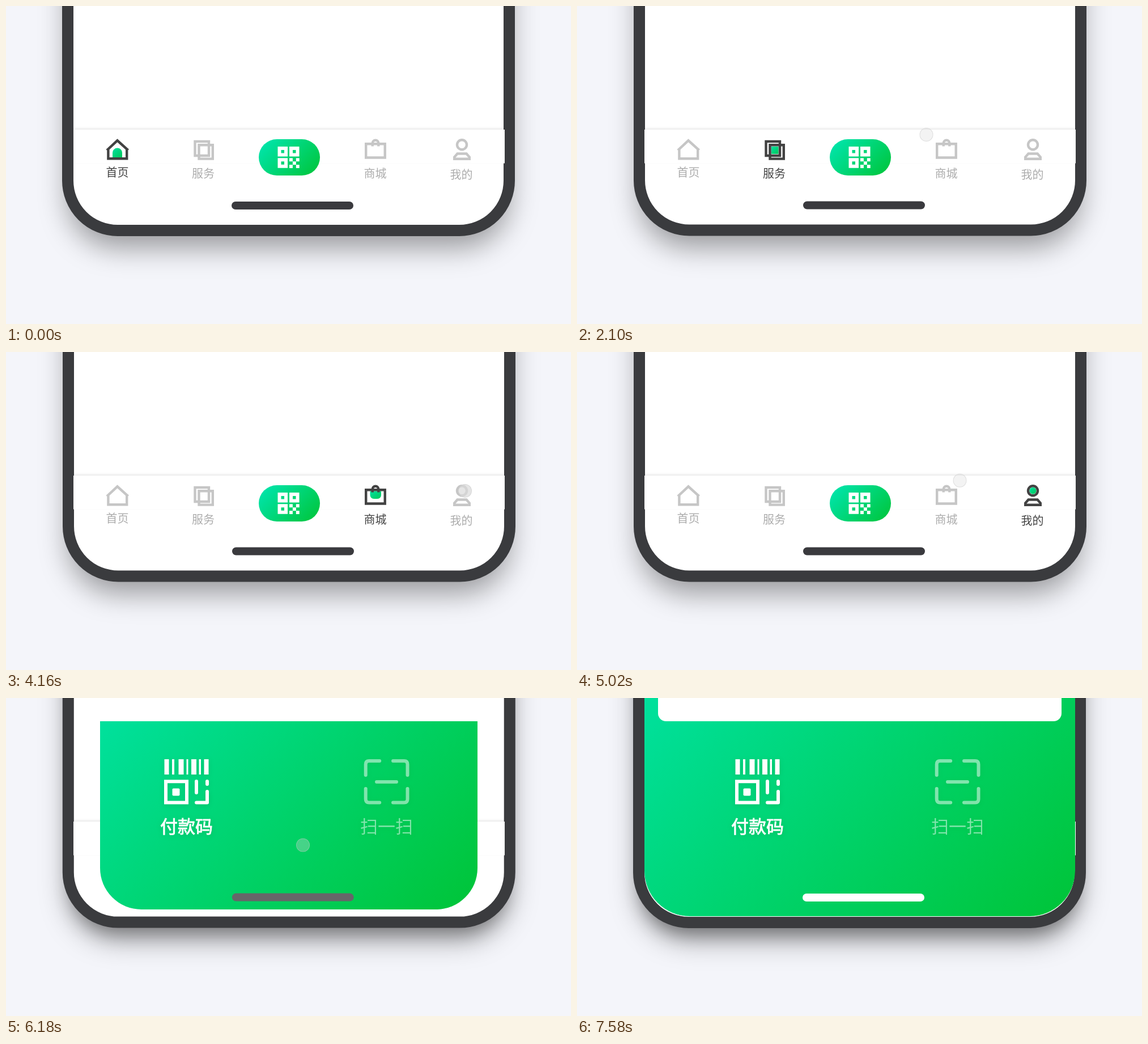
An HTML page for the animation above (8280 ms loop, 997 by 561 pixels).

```html
<!DOCTYPE html>
<html lang="zh-CN">
<head>
<meta charset="utf-8">
<style>
  html, body { margin: 0; width: 100%; height: 100%; overflow: hidden; background: #f4f5fa; }
  #stage { position: relative; width: 997px; height: 561px; overflow: hidden; }
  #stage div, svg { position: absolute; box-sizing: border-box; }
  svg { left: 0; top: 0; width: 997px; height: 561px; }
  text { font-family: "Noto Sans CJK SC", "Noto Sans CJK", "Noto Sans", sans-serif; text-anchor: middle; }
  #phone { left: 99px; top: -300px; width: 799px; height: 706px; border: 20px solid #3a3b3e;
    border-radius: 98px; background: #fff; }
  #bar { left: 119px; top: 217.5px; width: 761px; height: 60px; background: #fff;
    box-shadow: 0 -1px 5px rgba(0,0,0,.13); clip-path: inset(-10px 0 0 0); }
  #clip { inset: 0; clip-path: inset(0 118px 176px 118.5px round 0 0 80px 80px); }
  #green { background: linear-gradient(135deg, #00e7b4, #00c437); }
  #card { left: 143px; top: -60px; width: 712px; height: 101px; border-radius: 14px; background: #fff; }
  #home { left: 398px; top: 345.3px; width: 214.5px; height: 14.2px; border-radius: 7.1px; }
  #dot { left: -12px; top: -12px; width: 24px; height: 24px; border-radius: 50%;
    border: 1px solid rgba(195,195,195,.45); }
  #panel { filter: drop-shadow(0 2px 4px rgba(0,90,30,.18)); }
</style>
</head>
<body>
<div id="stage">
  <div id="phone"></div>
  <div id="bar"></div>
  <svg id="tabs">
    <defs>
      <linearGradient id="mint" x2="1" y2="1"><stop stop-color="#00e0a0"/><stop offset="1" stop-color="#00c85a"/></linearGradient>
    </defs>
  </svg>
  <div id="clip">
    <div id="green"></div>
    <svg id="code" fill="#fff"></svg>
    <svg id="panel" fill="none" stroke="#fff" stroke-width="6">
      <g fill="#fff" stroke="none" id="stripes"></g>
      <path d="M282 147.3h37v37.2h-37z"/>
      <rect x="293.5" y="159.5" width="13" height="13" rx="2" fill="#fff" stroke="none"/>
      <path d="M336 147v20M355 147v5M355 165v19.5h-19" stroke-linecap="round" stroke-linejoin="round"/>
      <text x="318.5" y="238" font-size="31" fill="#fff" stroke-width=".9">付款码</text>
      <g opacity=".5">
        <path stroke-linecap="round" d="M634.7 136V117q0-6 6-6h18.500M683 111h19.500q6 0 6 6v19M708.500 160v18.500q0 6-6 6H683M659.200 184.500h-18.500q-6 0-6-6V160M654 148h35"/>
        <text x="671.5" y="238" font-size="31" fill="#fff" stroke="none">扫一扫</text>
      </g>
    </svg>
    <div id="card"></div>
  </div>
  <div id="home"></div>
  <div id="dot"></div>
</div>
<script>
const $ = id => document.getElementById(id);
const LOOP = 8280, FADE = 300, OPEN = 6100;
const clamp = v => Math.max(0, Math.min(1, v));
const mix = (a, b, p) => a + (b - a) * p;
const easeOut = p => 1 - (1 - p) ** 3;
const easeInOut = p => Math.sin(p * Math.PI / 2) ** 2;
const fade = (t, start) => easeOut(clamp((t - start) / FADE));

// Each tab is active between "on" and "off".
const tabs = [
  { label: '首页', x: 196.5, y: 301, on: -FADE, off: 1530,
    icon: 'M178 254.500L196.500 237.300L215.500 254.500M180.400 252V269.300H213.200V252',
    fill: 'M188 267.500V259a8.500 8.500 0 0 1 17 0V267.500Z' },
  { label: '服务', x: 348, y: 303, on: 1530, off: 2950,
    icon: 'M333.500 239h24.500v25h-24.500zM340.500 245.300h24.300v24.300h-24.300z',
    fill: 'M343 248h12.500v13h-12.500z' },
  { label: '商城', x: 651.5, y: 303, on: 2950, off: 4330,
    icon: 'M635.200 243.200h33.500v24.300h-33.500zM646.700 247.500V242a5.300 5.300 0 0 1 10.600 0V247.500',
    fill: 'M642.500 245.500h19.500v6q0 7.500-7.500 7.500h-4.500q-7.500 0-7.500-7.500z' },
  { label: '我的', x: 803.5, y: 305, on: 4330, off: LOOP,
    icon: 'M796 244.800a8.500 8.500 0 1 1 17 0a8.500 8.500 0 1 1-17 0M791.200 269.700V266.500L796.500 260.500H812.500L817.800 266.500V269.700Z',
    fill: 'M798.500 244.800a6 6 0 1 1 12 0a6 6 0 1 1-12 0' }
];
$('tabs').innerHTML += tabs.map(tab => `<g>
  <path d="${tab.fill}" fill="url(#mint)"/>
  <path d="${tab.icon}" fill="none" stroke-width="4.4"/>
  <text x="${tab.x}" y="${tab.y}" font-size="20">${tab.label}</text></g>`).join('');
const tabNodes = [...$('tabs').querySelectorAll('g')].map(g => g.children);

const rect = (x, y, w, h = w) => `<rect x="${x}" y="${y}" width="${w}" height="${h}"/>`;
$('stripes').innerHTML = [[279.5, 8], [293, 4], [304.5, 9], [318.5, 3], [327, 9], [340.5, 3.5], [349.5, 8]]
  .map(([x, w]) => rect(x, 108, w, 27)).join('');
const finder = (x, y) => `<path fill-rule="evenodd" d="M${x} ${y}h17.5v17.5h-17.5zM${x + 6} ${y + 6}v5.5h5.5v-5.500z"/>`;
$('code').innerHTML = finder(479.5, 248) + finder(500, 248) + finder(479.5, 268.3) +
  [[0, 0], [2, 0], [1, 1], [0, 2], [2, 2]].map(([c, r]) => rect(500 + c * 5.9, 268.3 + r * 5.9, 5.9)).join('');

// Pointer strokes: start, end, from, control, to, easing.
const moves = [
  [300, 1060, [942, -14], [644, 126], [346.5, 266], easeOut],
  [1600, 2600, [346.5, 266], [500, 136], [655, 252], easeOut],
  [3040, 3800, [655, 252], [733, 179], [810, 245], easeOut],
  [4540, 5540, [810, 245], [667, 202], [524, 259.500], easeInOut],
  [7100, 7580, [524, 259.500], [725, 125], [926, -14], easeInOut]
];
const presses = [[1400, 1540], [2760, 2960], [4160, 4340], [5920, 6120]];

function pointer(t) {
  const [start, end, a, b, c, ease] = moves.filter(m => t >= m[0]).pop() || moves[0];
  const p = ease(clamp((t - start) / (end - start))), q = 1 - p;
  return a.map((v, i) => q * q * v + 2 * p * q * b[i] + p * p * c[i]);
}

function draw(t) {
  tabs.forEach((tab, i) => {
    const active = fade(t, tab.on) - fade(t, tab.off);
    const gray = from => `rgb(${Array(3).fill(mix(from, 66, active))})`;
    const [fill, icon, text] = tabNodes[i];
    fill.style.opacity = active;
    icon.style.stroke = gray(198);
    text.style.fill = gray(172);
  });

  const grow = t < OPEN ? 0 : 1 - Math.exp((OPEN - t) / 42);
  const late = clamp((t - OPEN) / 360);
  const [x, y, w, h, r] = [[445.5, 118.5], [235, -260], [108.7, 760.5], [64, 645], [32, 80]]
    .map(([a, b]) => mix(a, b, grow));
  Object.assign($('green').style, {
    left: x + 'px', top: y + 'px', width: w + 'px', height: h + 'px', borderRadius: r + 'px'
  });
  $('code').style.opacity = clamp(1 - grow * 1.5);
  $('panel').style.opacity = clamp(grow * 1.2);

  const nudge = fade(t, 1530) * (1 - late);
  $('phone').style.transform = $('home').style.transform = `translate(${nudge}px, ${-nudge / 2}px)`;
  $('phone').style.boxShadow = `0 30px 50px -10px rgba(0,0,0,.38), 0 24px 30px -14px rgba(0,0,0,${.3 * grow})`;
  $('home').style.background = `rgb(${[58, 58, 62].map(v => mix(v, 255, late))})`;

  const [px, py] = pointer(t);
  const pressed = presses.some(([a, b]) => t >= a && t < b);
  $('dot').style.transform = `translate(${px}px, ${py}px)`;
  $('dot').style.background = `rgba(218,218,218,${pressed ? .7 : .32})`;
  $('dot').style.visibility = t >= 300 && t < 7580 ? 'visible' : 'hidden';
}

const begin = performance.now();
(function frame() {
  draw((performance.now() - begin) % LOOP);
  requestAnimationFrame(frame);
})();
</script>
</body>
</html>
```
